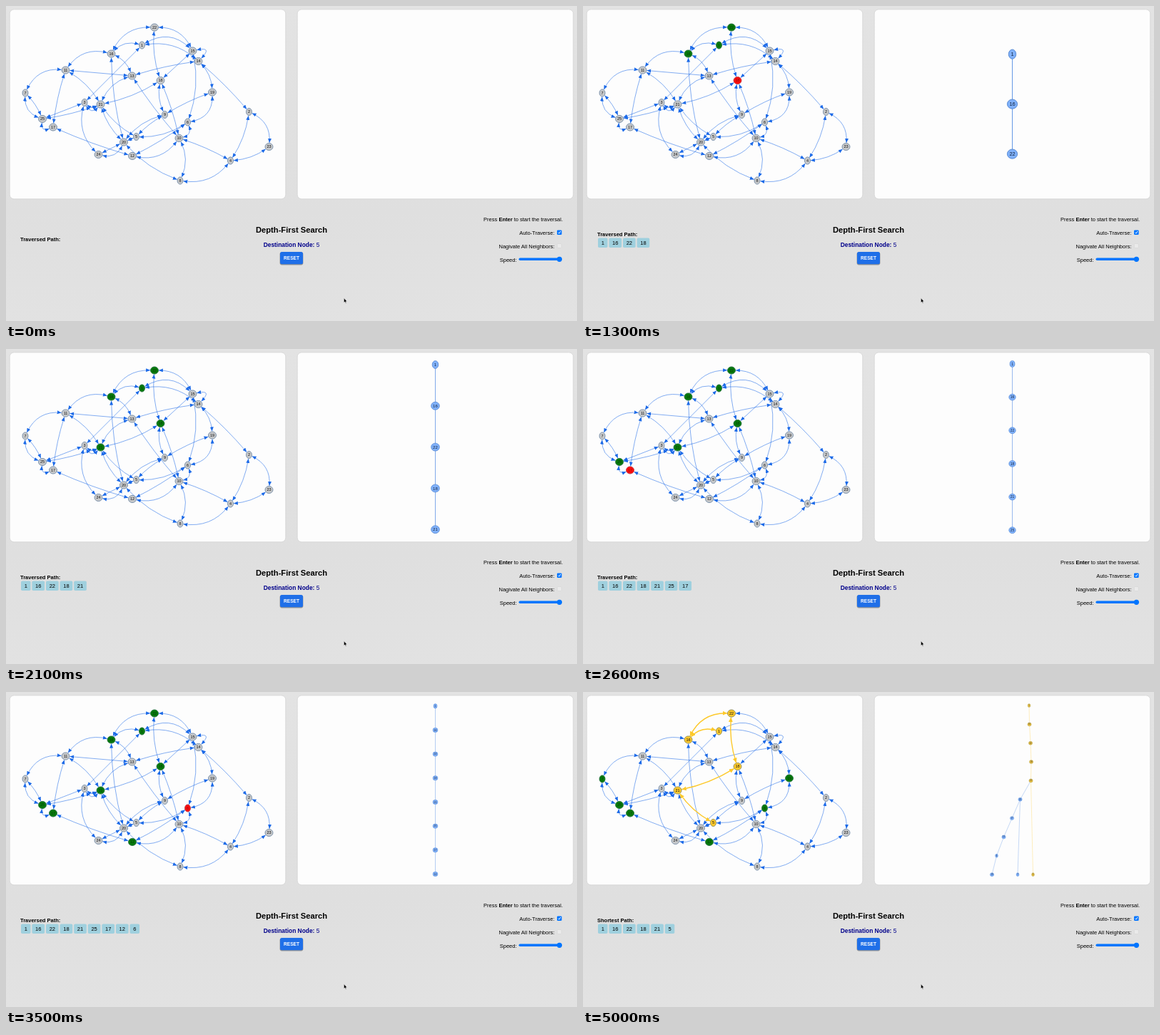
These frames come from a looping animation (800x442 px, 5.1 s). An HTML page:

```html
<!DOCTYPE html>
<html lang="en">
<head>
<meta charset="utf-8">
<title>Depth-First Search</title>
<style>
  html, body { margin: 0; width: 100%; height: 100%; overflow: hidden; background: #e1e1e1; }
  svg { display: block; width: 100%; height: 100%; }
  text { font-family: Arial, "Liberation Sans", sans-serif; font-size: 7.5px; fill: #000; }
  .b { font-weight: bold; }
  .mid { text-anchor: middle; }
  .end { text-anchor: end; }
</style>
</head>
<body>
<svg viewBox="0 0 800 442" preserveAspectRatio="none">
  <defs>
    <linearGradient id="bg" x1="0" y1="0" x2="0" y2="1">
      <stop offset="0" stop-color="#e3e3e3"/>
      <stop offset=".65" stop-color="#dfdfdf"/>
      <stop offset="1" stop-color="#e2e2e2"/>
    </linearGradient>
    <marker id="blue" orient="auto-start-reverse" markerUnits="userSpaceOnUse" markerWidth="7" markerHeight="6" refX="6" refY="2.5">
      <path d="M0 0L6 2.5L0 5Z" fill="#1c6ae8"/>
    </marker>
    <marker id="gold" orient="auto-start-reverse" markerUnits="userSpaceOnUse" markerWidth="8" markerHeight="7" refX="6.5" refY="3">
      <path d="M0 0L6.5 3L0 6Z" fill="#fdc92b"/>
    </marker>
  </defs>
  <rect width="800" height="442" fill="url(#bg)"/>
  <g fill="#fdfdfd" stroke="#d3d3d3" stroke-width=".8">
    <rect x="5.2" y="4.8" width="386.6" height="266" rx="6"/>
    <rect x="408.2" y="4.8" width="386.6" height="266" rx="6"/>
  </g>
  <g id="graph"></g>
  <g id="tree"></g>
  <g id="path"></g>

  <text class="b mid" x="400" y="318" style="font-size:11.2px">Depth-First Search</text>
  <text class="mid" x="400" y="337.6" style="font-size:8.4px;fill:#00008b"><tspan class="b">Destination Node:</tspan> 5</text>
  <rect x="383.6" y="345.6" width="32.8" height="17.8" rx="2.8" fill="#000" opacity=".35"/>
  <rect x="384" y="345" width="32" height="17.2" rx="2.5" fill="#1f6fe8"/>
  <text class="b mid" x="400" y="356.2" style="font-size:6.6px;fill:#fff">RESET</text>

  <text class="end" x="780" y="302">Press <tspan class="b">Enter</tspan> to start the traversal.</text>
  <text class="end" x="768.5" y="320.6">Auto-Traverse:</text>
  <text class="end" x="768.5" y="339.6">Nagivate All Neighbors:</text>
  <text class="end" x="715.5" y="358.6">Speed:</text>
  <rect x="772" y="314.4" width="6.6" height="6.6" rx="1.2" fill="#0075ff"/>
  <path d="M773.6 317.8L774.8 319.2L777.1 316" fill="none" stroke="#fff" stroke-width="1"/>
  <rect x="772.3" y="333.5" width="6" height="6" rx="1.1" fill="#eaeaea" stroke="#d0d0d0" stroke-width=".5"/>
  <rect x="718.5" y="353.6" width="60" height="3.4" rx="1.7" fill="#0075ff"/>
  <circle cx="775.4" cy="355.3" r="3.6" fill="#0075ff"/>
  <path d="M473.4 409.8V416.3L474.9 415L475.9 417.3L476.9 416.9L475.9 414.7H478Z" fill="#000" stroke="#fff" stroke-width=".5"/>
</svg>
<script>
const LOOP = 5100, TICK = 100;
const START = 40, STEP = 420, RED = 130;
const BLUE = '#1c6ae8', GOLD = '#fdc92b';

const nodes = {
  1: [190.5, 55], 2: [340.5, 148.5], 3: [110, 135.5], 4: [314.5, 217], 5: [182.5, 183.5],
  6: [254.5, 163], 7: [27, 122], 8: [244, 245], 9: [222.5, 152.5], 10: [242.5, 185.5],
  11: [83.5, 90], 12: [177, 210.5], 13: [176.5, 98], 14: [269.5, 77.5], 15: [261.5, 63],
  16: [147.5, 67], 17: [66, 170], 18: [216.5, 104.5], 19: [289, 121], 20: [165, 191],
  21: [132.5, 138], 22: [208, 30], 23: [368.5, 197.5], 24: [129.5, 208.5], 25: [51, 158.5]
};
const order = [1, 16, 22, 18, 21, 25, 17, 12, 6, 19, 7, 5];
const shortest = [1, 16, 22, 18, 21, 5];

// Links grouped by how far they bow to the right of their direction
const links = [];
function bow(size, pairs) {
  for (const p of pairs.split(' ')) {
    const [a, b] = p.split('-').map(Number);
    links.push({ a, b, size });
  }
}
bow(-14, '1-15 15-14');
bow(-11.5, '16-22 11-16 7-11 19-6');
bow(-9.8, '22-15 1-14 2-23');
bow(-7, '16-1 15-6 21-13 10-8 6-10');
bow(-4.5, '16-13 14-19 11-21');
bow(-2, '13-14 9-19 18-10 7-25 14-2 10-4');
bow(0, '15-18 11-13 1-3 25-3 24-20 20-5');
bow(2, '13-10 11-17 25-21 17-12 12-6 9-5');
bow(4, '18-9 22-18 21-18 21-5 21-20 16-20 4-2 4-23 3-21');
bow(6, '5-6 20-8 9-20');
bow(8, '25-17 3-21 24-20 7-25');
bow(11, '3-24 12-10 8-4');

const el = id => document.getElementById(id);
const f = n => n.toFixed(2);
const pairs = list => list.slice(1).map((b, i) => [list[i], b]);
const onShortest = (a, b) => pairs(shortest).some(p => p.includes(a) && p.includes(b));
const radius = n => n > 9 ? 5.5 : 4;

function rim(n, cx, cy) {
  const [x, y] = nodes[n], dx = cx - x, dy = cy - y;
  const k = 1 / Math.hypot(dx / (radius(n) + .4), dy / 5.6);
  return f(x + dx * k) + ' ' + f(y + dy * k);
}

function drawLink({ a, b, size }, gold) {
  const [x1, y1] = nodes[a], [x2, y2] = nodes[b];
  const dx = x2 - x1, dy = y2 - y1, k = 2 * size / Math.hypot(dx, dy);
  const cx = (x1 + x2) / 2 - dy * k, cy = (y1 + y2) / 2 + dx * k;
  const m = `url(#${gold ? 'gold' : 'blue'})`;
  return `<path d="M${rim(a, cx, cy)}Q${f(cx)} ${f(cy)} ${rim(b, cx, cy)}" fill="none" stroke="${gold ? GOLD : BLUE}"
    stroke-width="${gold ? 1.4 : .55}" marker-start="${m}" marker-end="${m}"/>`;
}

function drawNode(n, x, y, rx, ry, size, [fill, rim, ink], line) {
  return `<ellipse cx="${f(x)}" cy="${f(y)}" rx="${f(rx)}" ry="${f(ry)}" fill="${fill}" stroke="${rim}" stroke-width="${f(line)}"/>
    <text class="mid" x="${f(x)}" y="${f(y + size * .36)}" style="font-size:${f(size)}px;fill:${ink}">${n}</text>`;
}

const looks = {
  idle: ['#c6c8ca', '#66809f', '#111'],
  red: ['#fb0d0d', '#b8353f', '#8a1212'],
  green: ['#087a0c', '#1c6a3a', '#053f08'],
  gold: ['#fdc92b', '#7d7f52', '#111'],
  tree: ['#80b1fa', '#4c82cf', '#12243f'],
  treeGold: ['#f0c540', '#8f9063', '#333']
};

function drawGraph(seen, red, done) {
  const look = n => done && shortest.includes(n) ? looks.gold
    : n === red ? looks.red : seen.includes(n) ? looks.green : looks.idle;
  const isGold = l => done && onShortest(l.a, l.b);
  const sorted = [...links].sort((p, q) => isGold(p) - isGold(q));
  return sorted.map(l => drawLink(l, isGold(l))).join('') +
    Object.entries(nodes).map(([n, [x, y]]) =>
      drawNode(n, x, y, radius(+n), 5.1, 5.5, look(+n), .8)).join('');
}

// Horizontal places once the tree has branches, in visiting order
const oneBranch = [610, 610, 611, 614, 617.5, 619.5, 610.5, 599, 588.5, 582, 621.5];
const twoBranches = [625, 625.5, 627, 628, 627.5, 612.5, 601, 589.5, 579.5, 573, 609, 630.5];

function drawTree(count, done) {
  const depth = Math.min(count, 10);
  const s = Math.min(1, 242 / ((depth - 1) * 70 + 13));
  const xs = count > 11 ? twoBranches : count > 10 ? oneBranch : null;
  const at = i => [xs ? xs[i] : 601.5, 137.6 + (Math.min(i, 9) - (depth - 1) / 2) * 70 * s];
  const parent = i => i === 10 ? 5 : i === 11 ? 4 : i - 1;
  let lines = '', dots = '';
  for (let i = 0; i < count; i++) {
    const n = order[i], [x, y] = at(i);
    if (i) {
      const [px, py] = at(parent(i));
      const gold = done && onShortest(n, order[parent(i)]);
      lines += `<path d="M${f(px)} ${f(py)}L${f(x)} ${f(y)}" stroke="${gold ? GOLD : '#3f7fe0'}" stroke-width="${f(.8 * s)}"/>`;
    }
    const look = done && shortest.includes(n) ? looks.treeGold : looks.tree;
    dots += drawNode(n, x, y, (n > 9 ? 7.1 : 5.2) * s, 6.6 * s, 7.4 * s, look, .9 * s);
  }
  return lines + dots;
}

function drawPath(list, done) {
  let x = 21;
  const chips = list.map(n => {
    const w = 9.3 + 4.17 * String(n).length;
    const chip = `<rect x="${f(x)}" y="325.4" width="${f(w)}" height="13.6" rx="1.8" fill="#9fd0de"/>
      <text class="mid" x="${f(x + w / 2)}" y="334.7">${n}</text>`;
    x += w + 1.95;
    return chip;
  });
  return `<text class="b" x="20" y="${list.length ? 322.8 : 330.4}">${done ? 'Shortest' : 'Traversed'} Path:</text>` + chips.join('');
}

let shown = '';
function render(ms) {
  const t = Math.floor(ms % LOOP / TICK) * TICK - START;
  const count = t < 0 ? 0 : Math.min(order.length, Math.floor(t / STEP) + 1);
  const busy = count > 0 && t - (count - 1) * STEP < RED;
  const key = count + '/' + busy;
  if (key === shown) return;
  shown = key;
  const done = count === order.length && !busy;
  const seen = order.slice(0, count);
  el('graph').innerHTML = drawGraph(seen, busy ? order[count - 1] : 0, done);
  el('tree').innerHTML = drawTree(busy ? count - 1 : count, done);
  el('path').innerHTML = drawPath(done ? shortest : seen, done);
}

function loop() {
  render(performance.now());
  requestAnimationFrame(loop);
}
loop();
</script>
</body>
</html>
```
